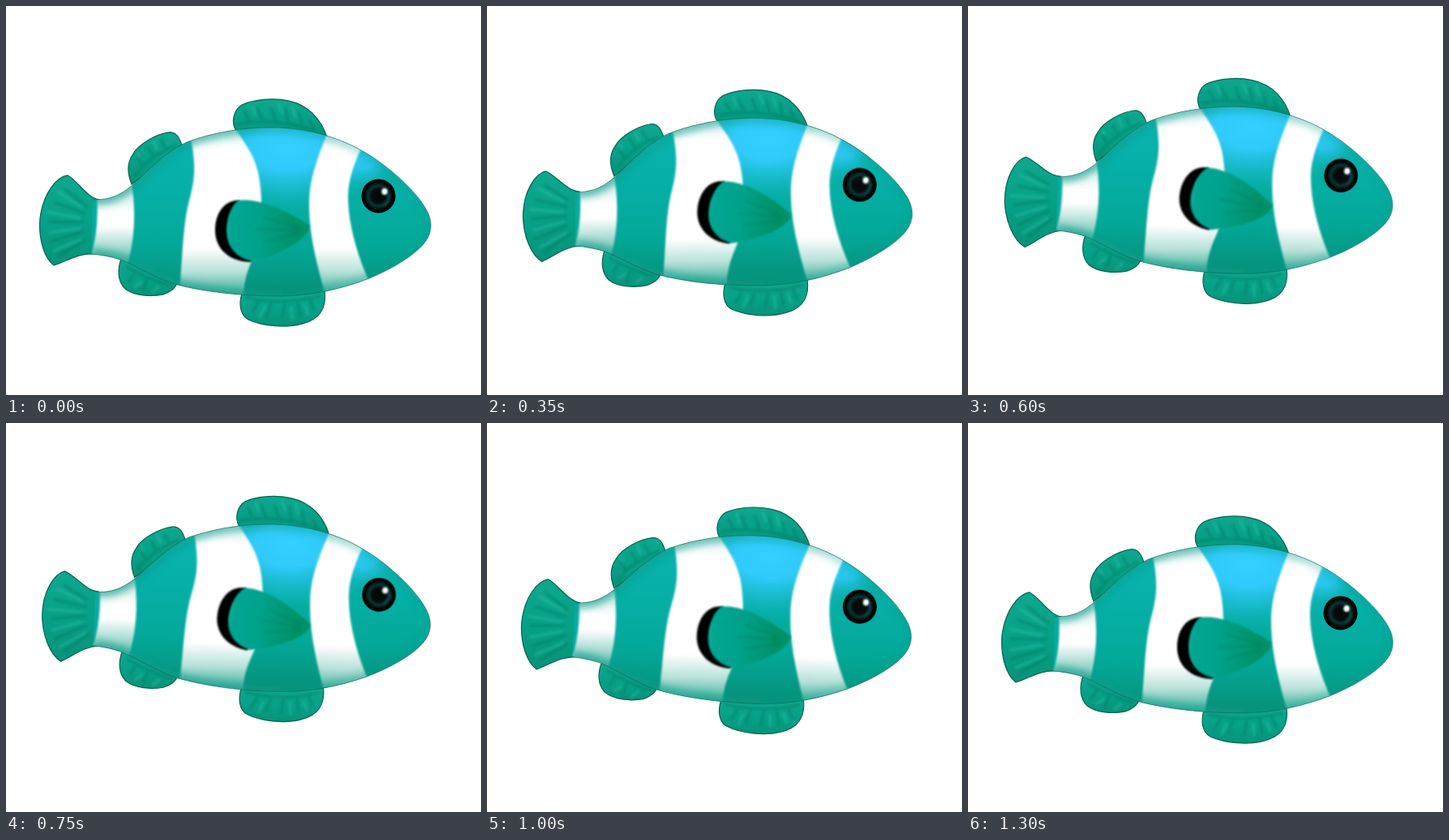
Write an HTML page that moves like this. It is 586 by 480 pixels and loops after 1350 ms.

```html
<!DOCTYPE html>
<html lang="en">
<head>
<meta charset="utf-8">
<title>Swimming fish</title>
<style>
  html, body { margin: 0; width: 100%; height: 100%; overflow: hidden; background: #fff; }
  svg { display: block; width: 586px; height: 480px; }
  .fin { fill: url(#finFill); stroke: #066350; stroke-width: 1.2; }
  .ray { fill: none; stroke-linecap: round; stroke-width: 3.5; filter: url(#soft2); }
  .dark { stroke: #00745a; opacity: .38; }
  .light { stroke: #35c3ab; opacity: .4; }
  .faint { opacity: .22; }
</style>
</head>
<body>
<svg viewBox="0 0 586 480">
  <defs>
    <linearGradient id="bodyFill" gradientUnits="userSpaceOnUse" x1="0" y1="150" x2="0" y2="358">
      <stop offset="0" stop-color="#0cb3b0"/>
      <stop offset=".35" stop-color="#06b0a8"/>
      <stop offset=".7" stop-color="#03a898"/>
      <stop offset="1" stop-color="#078f78"/>
    </linearGradient>
    <radialGradient id="sheen">
      <stop offset="0" stop-color="#33cfff"/>
      <stop offset=".35" stop-color="#30cbfa"/>
      <stop offset=".65" stop-color="#20c0dc" stop-opacity=".65"/>
      <stop offset="1" stop-color="#10b5b8" stop-opacity="0"/>
    </radialGradient>
    <linearGradient id="bandFill" gradientUnits="userSpaceOnUse" x1="0" y1="152" x2="0" y2="356">
      <stop offset="0" stop-color="#d6efec"/>
      <stop offset=".12" stop-color="#fff"/>
      <stop offset=".72" stop-color="#fff"/>
      <stop offset=".86" stop-color="#b9e2da"/>
      <stop offset="1" stop-color="#3aaf9a"/>
    </linearGradient>
    <linearGradient id="tailBand" gradientUnits="userSpaceOnUse" x1="0" y1="230" x2="0" y2="314">
      <stop offset="0" stop-color="#d5eeea"/>
      <stop offset=".3" stop-color="#fff"/>
      <stop offset=".5" stop-color="#fff"/>
      <stop offset="1" stop-color="#6cc2b3"/>
    </linearGradient>
    <linearGradient id="finFill" x1="0" y1="0" x2="0" y2="1">
      <stop offset="0" stop-color="#0ea88f"/>
      <stop offset=".55" stop-color="#06a088"/>
      <stop offset="1" stop-color="#079377"/>
    </linearGradient>
    <linearGradient id="pecFill">
      <stop offset="0" stop-color="#07a794"/>
      <stop offset=".4" stop-color="#05a189"/>
      <stop offset=".85" stop-color="#069166"/>
    </linearGradient>
    <linearGradient id="edgeFill" gradientUnits="userSpaceOnUse" x1="100" y1="0" x2="525" y2="0">
      <stop offset="0" stop-color="#0a9d8a"/>
      <stop offset=".45" stop-color="#0a9d8a" stop-opacity=".8"/>
      <stop offset=".75" stop-color="#0a9d8a" stop-opacity=".4"/>
    </linearGradient>
    <radialGradient id="iris">
      <stop offset="0" stop-color="#020808"/>
      <stop offset=".4" stop-color="#020c0c"/>
      <stop offset=".6" stop-color="#0b3433"/>
      <stop offset=".75" stop-color="#041615"/>
      <stop offset=".85" stop-color="#000"/>
    </radialGradient>
    <filter id="soft05"><feGaussianBlur stdDeviation=".6"/></filter>
    <filter id="soft1" x="-20%" y="-20%" width="140%" height="140%"><feGaussianBlur stdDeviation="1"/></filter>
    <filter id="soft2" x="-50%" y="-50%" width="200%" height="200%"><feGaussianBlur stdDeviation="1.8"/></filter>
    <filter id="soft5" x="-10%" y="-10%" width="120%" height="120%"><feGaussianBlur stdDeviation="5"/></filter>
    <path id="bodyShape" d="M106 239C128 240 142 232 155 221C172 205 195 180 222 168C255 156 290 150 325 150C365 150 405 160 437 178C465 193 500 223 515 247C525 262 526 277 517 290C505 307 475 325 445 337C410 350 375 358 335 358C290 358 245 353 210 344C180 335 155 318 140 313C128 309 115 307 104 306"/>
    <clipPath id="bodyClip"><use href="#bodyShape"/></clipPath>
  </defs>

  <g id="fish">
    <g id="body">
      <g id="tail">
        <path class="fin" d="M114 239C98 236 88 216 75 209C62 211 45 230 41 262C39 285 45 310 58 320C75 315 86 305 108 306Z"/>
        <path class="ray dark" d="M98 247L72 226M96 256L60 243M94 267L52 266M94 279L54 291M96 290L64 308"/>
        <path class="ray light" d="M92 248L64 230M90 262L50 254M90 274L52 280M92 288L58 302"/>
      </g>

      <path class="fin" d="M283 154C276 143 280 128 290 122C305 115 330 113 347 117C372 122 388 140 395 162Z"/>
      <path class="ray dark" d="M284 146Q336 136 390 158M300 143L293 130M316 141L309 127M332 141L326 126M348 144L344 128M364 148L361 133M379 153L374 141"/>
      <path class="ray light" d="M307 134L303 124M340 132L335 121M356 136L352 124"/>

      <path class="fin" d="M154 220C148 205 149 193 155 184C162 170 185 158 200 156C209 155 213 163 216 172Z"/>
      <path class="ray dark" d="M158 210Q172 188 208 172M168 198L161 188M181 186L174 175M196 176L190 165"/>
      <path class="ray light" d="M164 186L161 181M185 176L181 167"/>

      <path class="fin" d="M290 355C286 368 288 382 298 387C315 395 345 398 365 392C385 387 395 375 392 351Z"/>
      <path class="ray dark" d="M296 360Q344 370 386 358M310 366L303 378M326 368L321 382M343 368L340 384M359 366L362 382M374 363L379 375"/>
      <path class="ray light" d="M318 372L312 384M351 372L352 386M368 370L372 380"/>

      <path class="fin" d="M141 312C136 326 137 340 146 349C158 358 178 359 193 356C202 353 208 349 210 342Z"/>
      <path class="ray dark" d="M148 322Q172 336 202 345M158 329L151 340M173 337L168 350"/>
      <path class="ray light" d="M166 341L158 347M187 347L180 353"/>

      <g clip-path="url(#bodyClip)">
        <use href="#bodyShape" fill="url(#bodyFill)"/>
        <ellipse cx="346" cy="175" rx="125" ry="78" fill="url(#sheen)"/>
        <ellipse cx="438" cy="188" rx="46" ry="38" fill="url(#sheen)" opacity=".75"/>
        <g filter="url(#soft1)">
          <path fill="url(#tailBand)" d="M111 230C113 262 111 285 103 312L148 322C158 290 160 250 153 215Z"/>
          <path fill="url(#bandFill)" d="M226 160C234 195 232 215 225 240C217 270 217 310 213 350L292 362C292 335 300 320 306 305C316 265 316 235 310 205C304 180 290 165 280 148Z"/>
          <path fill="url(#bandFill)" d="M397 152C385 185 373 210 373 245C373 285 383 320 394 360L448 342C433 310 421 270 421 235C421 215 429 192 439 172Z"/>
        </g>
        <use href="#bodyShape" fill="none" stroke="url(#edgeFill)" stroke-width="12" opacity=".75" filter="url(#soft5)"/>
      </g>
      <use href="#bodyShape" fill="none" stroke="#0b6558" stroke-opacity=".6"/>

      <circle cx="458.500" cy="234.500" r="21" fill="url(#iris)" filter="url(#soft05)"/>
      <path d="M464 247Q472 242 472 233" fill="none" stroke="#174b49" stroke-width="3" opacity=".6" filter="url(#soft1)"/>
      <ellipse cx="466" cy="229" rx="3.600" ry="4" fill="#fff" filter="url(#soft1)"/>
      <circle cx="466.500" cy="228.500" r="2" fill="#fff"/>
    </g>

    <g id="pec">
      <path filter="url(#soft1)" d="M287 240C268 239 257 256 257 277C257 300 275 316 301 316L310 300L290 250Z"/>
      <path fill="url(#pecFill)" filter="url(#soft1)" d="M285 240C305 237 336 246 373 271C374 285 345 304 304 315C283 312 271 297 271 277C271 262 276 248 285 240Z"/>
      <path class="ray dark faint" d="M362 274L318 261M362 276L308 276M360 280L318 291"/>
    </g>
  </g>
</svg>
<script>
  const STEP = 50, LOOP = 1350, SWIM = 1300;
  const [fish, body, tail, pec] = ['fish', 'body', 'tail', 'pec'].map(id => document.getElementById(id));
  const phase = (t, shift) => 2 * Math.PI * (t + shift) / SWIM;
  const pitchAt = t => -1.25 * Math.sin(phase(t, 70));
  const tailAt = t => 4.4 * Math.cos(phase(t, 100));
  const turn = (el, deg, x, y) => el.setAttribute('transform', `rotate(${deg.toFixed(3)} ${x} ${y})`);

  // Bob with a slight shrink towards the nose
  function bob(dy, scale) {
    fish.setAttribute('transform',
      `translate(524 ${(240 + dy).toFixed(2)}) scale(${scale.toFixed(4)}) translate(-523 -240)`);
  }

  function pose(t) {
    const a = phase(t, 25), lift = (1 - Math.cos(a)) / 2;
    const pitch = pitchAt(t) - pitchAt(0);
    bob(-25.5 * lift + 2 * Math.sin(a) ** 2, 1 - 0.009 * lift);
    turn(body, pitch, 460, 240);
    turn(tail, tailAt(t) - tailAt(0) - pitch, 110, 272);
    turn(pec, 10.5 * lift, 372, 272);
  }

  const start = performance.now();
  function tick() {
    const t = (performance.now() - start) % LOOP;
    pose(Math.floor(t / STEP) * STEP);
    requestAnimationFrame(tick);
  }
  tick();
</script>
</body>
</html>
```
